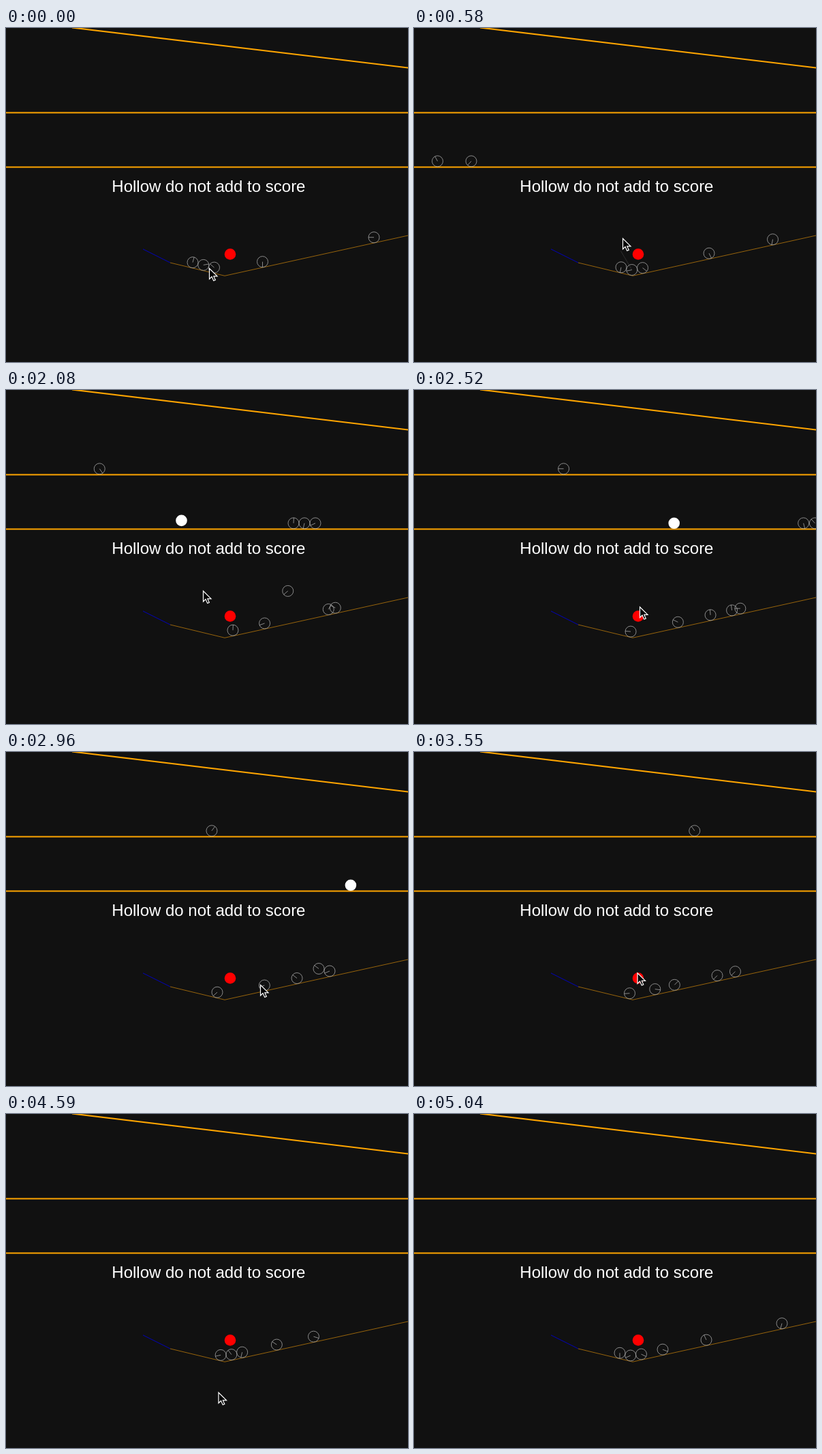
Animation of 590 by 491 pixels, one loop 5190 ms. Source, as an HTML page with a canvas:

```html
<!DOCTYPE html>
<html>
<head>
<meta charset="utf-8">
<style>
html, body { margin: 0; width: 590px; height: 491px; overflow: hidden; background: #111; }
canvas { display: block; }
</style>
</head>
<body>
<canvas id="stage" width="590" height="491"></canvas>
<script>
const ctx = document.getElementById('stage').getContext('2d');
const LOOP = 5190, STEP = 148, LAST = 34;
const R = 8, GAP = 15.75, SPIN = 5.9; // SPIN: degrees turned per pixel travelled
const GREY = '#a8a8a8', ORANGE = '#ffa500';

// Height of a resting ball's centre on each track
const upper = () => 115.8;
const lower = () => 195.8;
const valley = x => 355.8 - (x < 321 ? 0.2375 * (321 - x) : 0.2193 * (x - 321));

// Smooth curve through column c of a few key points, without overshoot
function through(keys, s, c = 1) {
  const slope = i => (keys[i + 1][c] - keys[i][c]) / (keys[i + 1][0] - keys[i][0]);
  const tangent = i => {
    if (i === 0) return slope(0);
    if (i === keys.length - 1) return slope(i - 1);
    const a = slope(i - 1), b = slope(i);
    return a * b > 0 ? 2 * a * b / (a + b) : 0;
  };
  let i = 0;
  while (i < keys.length - 2 && s > keys[i + 1][0]) i++;
  const h = keys[i + 1][0] - keys[i][0], u = (s - keys[i][0]) / h, v = 1 - u;
  return keys[i][c] * v * v * (1 + 2 * u) + keys[i + 1][c] * u * u * (3 - 2 * u)
    + h * u * v * (tangent(i) * v - tangent(i + 1) * u);
}

// Parabolic jump between two steps
const hop = (s, from, to, height) =>
  Math.max(0, height * (1 - ((2 * s - from - to) / (to - from)) ** 2));

// Rolls along a level track; x, speed and heading are those at step 9
const roller = (track, x, speed, gain, heading) => ({
  track, heading, home: x,
  x: s => x + speed * (s - 9) + gain * (s - 9) ** 2,
});

// Rolls in the valley, with its heading given at step 0
const valleyBall = (x, heading, lift) => ({ track: valley, heading, home: x(0), x, lift });

// Three balls roll together, drift apart and meet again
const lead = s => through([[0, 274], [4, 304], [11, 341], [20, 310], [28, 323], [34, 302]], s);
const spread = s => s > 9 && s < 28 ? Math.sin(Math.PI * (s - 9) / 19) ** 2 : 0;
const climber = s => through([[0, 376.5], [9, 478.5], [20, 459], [28, 424], [34, 365]], s);
const follower = s => through([[0, 540], [4, 526.5], [9, 494], [20, 475], [28, 467], [34, 429]], s);

const held = valleyBall(s => lead(s) + GAP + 57 * spread(s), -10);
const balls = [
  roller(upper, 0, 27.45, 0, -35),
  roller(lower, 254, 37, 0.6, 55),
  roller(lower, 207, 40.35, 1.17, 180),
  roller(lower, 191, 43.9, 0.46, -10),
  {
    ...roller(lower, 50.5, 41.4, 0, 0),
    solid: true,
    lift: s => hop(s, 4.6, 10.4, 25) + hop(s, 10.4, 14.35, 12),
  },
  valleyBall(lead, -75),
  held,
  valleyBall(s => lead(s) + 2 * GAP + 91 * spread(s), 221, s => hop(s, 11.8, 16.2, 40)),
  valleyBall(climber, 90, s => hop(s, 18, 22, 7)),
  valleyBall(follower, 180),
  valleyBall(s => 540 + 25 * (LAST - s), 80),
];

const pointer = [[0, 298.5, 353], [4, 306.5, 309], [9, 289.5, 295], [14, 289.5, 295],
  [20, 373.5, 342], [28, 282.5, 307], [31, 312, 409]];
const pointerAt = s => [through(pointer, s, 1), through(pointer, s, 2)];

function place(ball, s) {
  const x = ball.x(s);
  return [x, ball.track(x) - (ball.lift ? ball.lift(s) : 0)];
}

function line(color, width, ...points) {
  ctx.strokeStyle = color;
  ctx.lineWidth = width;
  ctx.beginPath();
  points.forEach(p => ctx.lineTo(...p));
  ctx.stroke();
}

function disc(color, x, y) {
  ctx.fillStyle = color;
  ctx.beginPath();
  ctx.arc(x, y, 8.3, 0, 7);
  ctx.fill();
}

function drawBall(ball, s) {
  const [x, y] = place(ball, s);
  if (ball.solid) return disc('#fff', x, y);
  const a = (ball.heading + SPIN * (x - ball.home)) * Math.PI / 180;
  line(GREY, 0.8, [x, y], [x + R * Math.cos(a), y + R * Math.sin(a)]);
  ctx.beginPath();
  ctx.arc(x, y, R, 0, 7);
  ctx.stroke();
}

function drawPointer(s) {
  if (s > 31) return;
  ctx.save();
  ctx.translate(...pointerAt(s));
  ctx.beginPath();
  [[0, 0.5], [0, 16], [3.5, 12.6], [6.2, 18.5], [8.8, 17.4], [6.3, 11.9], [11.5, 11.9]]
    .forEach(p => ctx.lineTo(...p));
  ctx.closePath();
  ctx.fillStyle = '#000';
  ctx.fill();
  ctx.strokeStyle = '#fff';
  ctx.lineWidth = 1.2;
  ctx.stroke();
  ctx.restore();
}

function draw(s) {
  ctx.fillStyle = '#111';
  ctx.fillRect(0, 0, 590, 491);

  line(ORANGE, 2, [97, -0.6], [590, 58.5]);
  for (const y of [124.5, 204.5]) line(ORANGE, 2, [0, y], [590, y]);
  line('#0000d0', 0.9, [201, 325], [241, 345]);
  line('#a56d0c', 0.9, [241, 345], [321, 364.3], [590, 305]);

  // The drag line trails behind the pointer
  if (s >= 2 && s <= 12) line('#333', 0.9, pointerAt(s - 2), place(held, s));
  disc('#f00', 329, 332.5);
  balls.forEach(b => drawBall(b, s));

  ctx.fillStyle = '#fff';
  ctx.font = '24px "Liberation Sans", Arial, sans-serif';
  ctx.fillText('Hollow do not add to score', 155.3, 241);
  drawPointer(s);
}

const start = performance.now();
function tick() {
  const t = (performance.now() - start) % LOOP;
  draw(Math.min(LAST, Math.floor((t + 12) / STEP)));
  requestAnimationFrame(tick);
}
tick();
</script>
</body>
</html>
```
